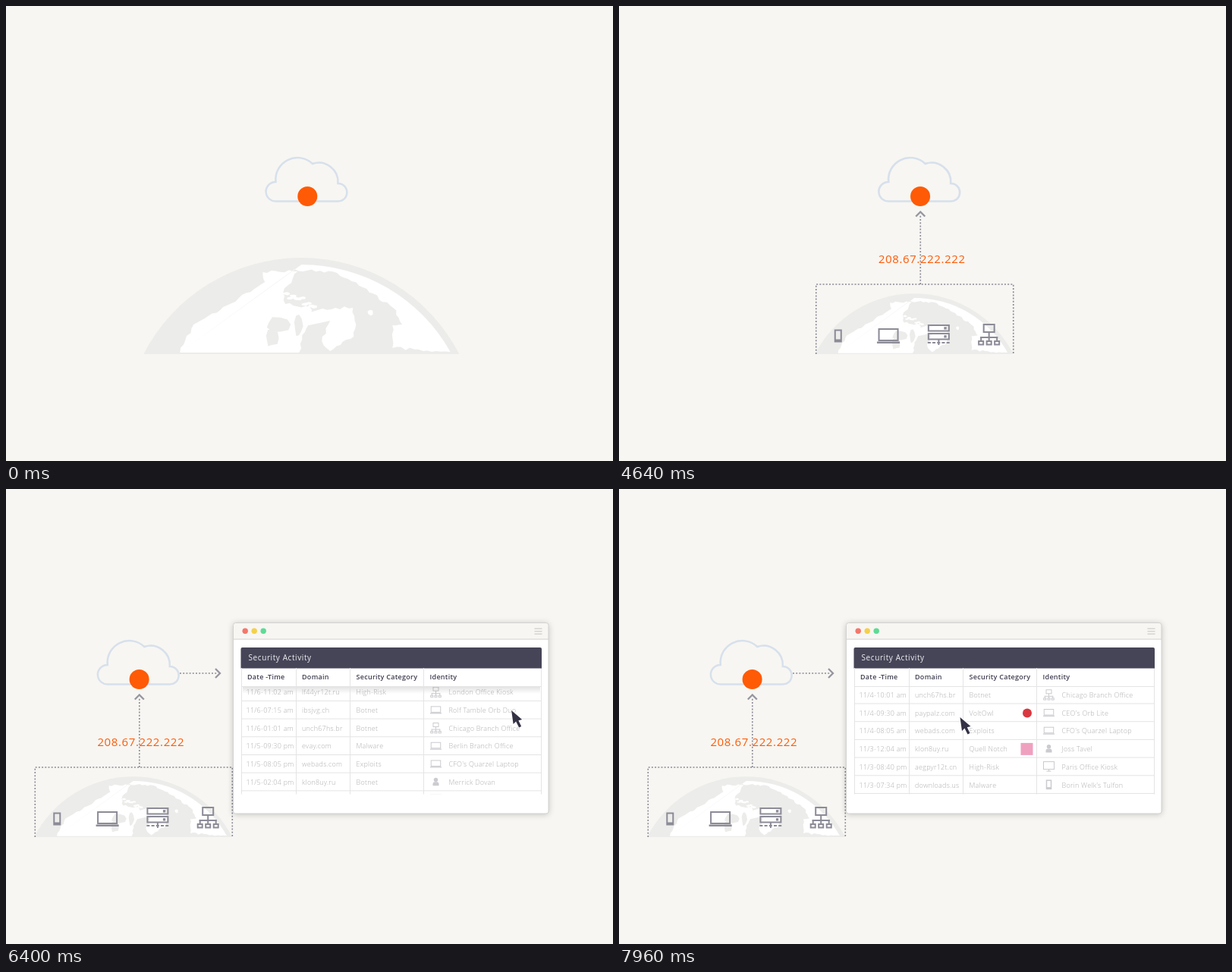
Recreate the animation shown at these times as an HTML page with a canvas. Size 800 by 600 pixels, loop 8 s.

```html
<!DOCTYPE html>
<html lang="en">
<head>
<meta charset="utf-8">
<title>Security activity</title>
<style>
html, body { margin: 0; height: 100%; overflow: hidden; background: #f7f6f2; }
canvas { display: block; width: 800px; height: 600px; }
</style>
</head>
<body>
<canvas id="stage" width="800" height="600"></canvas>
<script>
const LOOP = 8000, STEP = 40;
const screen2d = document.getElementById('stage').getContext('2d');
const buffer = new OffscreenCanvas(800, 600);
const g = buffer.getContext('2d');

const PAPER = '#f7f6f2', INK = '#8c8b97', ORANGE = '#ff5a05', SEA = '#ececea', LINE = '#e4e4e4';
const SANS = '"Open Sans", sans-serif';

const span = (t, a, b) => Math.min(1, Math.max(0, (t - a) / (b - a)));
const inOut = p => p < .5 ? 4 * p ** 3 : 1 - 4 * (1 - p) ** 3;
const smooth = p => p * p * (3 - 2 * p);
const mix = (a, b, p) => a + (b - a) * p;
let seed = 11;
const random = () => (seed = seed * 16807 % 2147483647) / 2147483647;

function at(x, y, scale, alpha, paint) {
  if (alpha <= 0 || scale <= 0) return;
  g.save();
  g.translate(x, y);
  g.scale(scale, scale);
  g.globalAlpha *= alpha;
  paint();
  g.restore();
}
function clipped(x, y, w, h, paint) {
  g.save();
  g.beginPath();
  g.rect(x, y, w, h);
  g.clip();
  paint();
  g.restore();
}
function fill(path, color) {
  g.fillStyle = color;
  g.fill(new Path2D(path));
}
function stroke(path, color, width, dash = []) {
  g.strokeStyle = color;
  g.lineWidth = width;
  g.setLineDash(dash);
  g.stroke(new Path2D(path));
}
function box(x, y, w, h, color) {
  g.fillStyle = color;
  g.fillRect(x, y, w, h);
}
function rounded(x, y, w, h, radius) {
  const path = new Path2D();
  path.roundRect(x, y, w, h, radius);
  return path;
}
function disc(x, y, r, color) {
  g.fillStyle = color;
  g.beginPath();
  g.arc(x, y, r, 0, 7);
  g.fill();
}
function text(str, x, y, font, color, spacing) {
  g.font = `${font} ${SANS}`;
  g.letterSpacing = spacing + 'px';
  g.fillStyle = color;
  g.fillText(str, x, y);
}
const dotted = path => stroke(path, INK, 1.6, [2, 2.2]);
const arrowHead = (x, y, turn) => at(x, y, 1, 1, () => {
  g.rotate(turn);
  stroke('M-6 6L0 0 6 6', '#96959f', 2.3);
});

// Icons are drawn around their own centre.
const ICONS = {
  phone(frame, bar) {
    frame(-4, -7.5, 8, 15);
    bar(-4, 4.5, 8, 3);
  },
  laptop(frame, bar) {
    frame(-12.5, -9, 25, 15);
    bar(-15, 7.5, 30, 2.5);
  },
  server(frame, bar) {
    for (const y of [-12, -1]) {
      frame(-13.5, y, 27, 7.5);
      bar(7, y + 2.2, 3.3, 3.3);
    }
    for (let x = -14.5; x < 14; x += 6.2) bar(x, 10, 4, 2);
    bar(-1, 7, 2, 7);
  },
  network(frame, bar) {
    frame(-7, -13, 14, 10);
    bar(-1, -3, 2, 6);
    bar(-11.5, 3, 23, 2);
    for (const x of [-10.5, 0, 10.5]) {
      bar(x - 1, 3, 2, 6);
      frame(x - 3, 9, 6, 4.5);
    }
  },
  monitor(frame, bar) {
    frame(-14, -13, 28, 20);
    bar(-1, 7, 2, 5);
    bar(-6, 11, 12, 2);
  },
  person(frame, bar, color) {
    disc(0, -5.5, 5.5, color);
    g.fill(rounded(-8, 0, 16, 10, [6, 6, 0, 0]));
  }
};
function icon(name, x, y, scale, alpha, color) {
  at(x, y, scale, alpha, () => {
    g.strokeStyle = color;
    g.lineWidth = 2;
    g.setLineDash([]);
    ICONS[name]((...r) => g.strokeRect(...r), (...r) => box(...r, color), color);
  });
}

// Adds a ragged coast through a few key points.
function coast(path, points) {
  points.forEach(([x, y], i) => {
    if (!i) return path.lineTo(x, y);
    const [px, py] = points[i - 1];
    const length = Math.hypot(x - px, y - py), steps = Math.ceil(length / 6);
    for (let k = 1; k <= steps; k++) {
      const out = k < steps ? (random() - .5) * 4 / length : 0;
      path.lineTo(mix(px, x, k / steps) + (py - y) * out, mix(py, y, k / steps) + (x - px) * out);
    }
  });
  path.closePath();
}
function blob(path, x, y, rx, ry) {
  for (let k = 0; k < 9; k++) {
    const r = .75 + .4 * random(), a = k * Math.PI * 2 / 9;
    path[k ? 'lineTo' : 'moveTo'](x + rx * r * Math.cos(a), y + ry * r * Math.sin(a));
  }
  path.closePath();
}
const land = new Path2D(), bays = new Path2D();
coast(land, [[229, 457], [247, 420], [282, 401], [341, 364], [338, 351], [384, 350],
  [365, 378], [368, 393], [400, 397], [406, 414], [390, 434], [386, 457]]);
coast(land, [[417, 399], [457, 398], [461, 420], [458, 436], [427, 455], [416, 442], [427, 415]]);
land.arc(389, 566, 225, -1.57, -.51);
coast(land, [[584, 456], [509, 451], [509, 421], [522, 420], [510, 398], [470, 371], [436, 352], [380, 347]]);
for (let k = 0; k < 10; k++) blob(land, 370 + 4 * k, 379 + 1.2 * k + 8 * random(), 4.5, 2);
blob(land, 480, 404, 4, 4);
blob(bays, 359, 420, 15, 10);
blob(bays, 350, 438, 9, 11);
blob(bays, 385, 422, 6, 16);

function globe(scale) {
  at(389.3, 459, scale, 1, () => {
    g.translate(-389, -459);
    fill('M181 459A233.8 233.8 0 0 1 597 459Z', SEA);
    clipped(181, 320, 416, 137.3, () => {
      fill(land, '#fff');
      fill(bays, SEA);
    });
  });
}

function network(t) {
  globe(mix(1, .628, inOut(span(t, 40, 520))));
  stroke('M357 257.5H436A11.8 11.8 0 1 0 437.5 234A25.5 25.5 0 0 0 404 208A28.8 28.8 0 0 0 355.5 232A12.8 12.8 0 1 0 357 257.5Z', '#d7e0ec', 2.5);

  const pulse = span(t, 3760, 4160);
  if (pulse < 1) at(397, 248, 1, pulse && .5 * (1 - pulse), () => disc(0, 0, mix(12, 33, pulse), ORANGE));
  disc(397.3, 251, 13, ORANGE);

  ['phone', 'laptop', 'server', 'network'].forEach((name, i) => {
    const start = 1120 + 340 * i;
    icon(name, 289 + 66.3 * i, i < 2 ? 435 : 433, 1, smooth(span(t, start, start + 160)), INK);
  });

  // The dotted lines are uncovered upwards.
  const q = span(t, 2320, 3600) * 2;
  const shown = q < 1 ? 82 * q ** 1.3 : 82 + 107 * (q - 1);
  clipped(250, 459 - shown, 290, shown, () => {
    dotted('M260 459V367H520V459M397.5 367V276');
    arrowHead(397.5, 271.5, 0);
  });

  const ip = span(t, 3160, 3400);
  at(399.5, 333.5, mix(1.76, 1, ip), ip, () => {
    g.textAlign = 'center';
    text('208.67.222.222', 0, 5.3, '15px', ORANGE, .6);
  });
}

const ROWS = `11/6-11:02 am|lf44yr12t.ru|High-Risk|network|London Office Kiosk
11/6-07:15 am|ibsjvg.ch|Botnet|laptop|Rolf Tamble Orb Duo
11/6-01:01 am|unch67hs.br|Botnet|network|Chicago Branch Office
11/5-09:30 pm|evay.com|Malware|laptop|Berlin Branch Office
11/5-08:05 pm|webads.com|Exploits|laptop|CFO's Quarzel Laptop
11/5-02:04 pm|klon8uy.ru|Botnet|person|Merrick Dovan
11/5-01:20 pm|aegpyr12t.cn|High-Risk|monitor|Paris Office Kiosk
11/5-12:11 am|freeads.us|Malware|phone|Lorna Vesk Tulfon
11/4-10:01 am|unch67hs.br|Botnet|network|Chicago Branch Office
11/4-09:30 am|paypalz.com|VoltOwl|laptop|CEO's Orb Lite
11/4-08:05 am|webads.com|Exploits|laptop|CFO's Quarzel Laptop
11/3-12:04 am|klon8uy.ru|Quell Notch|person|Joss Tavel
11/3-08:40 pm|aegpyr12t.cn|High-Risk|monitor|Paris Office Kiosk
11/3-07:34 pm|downloads.us|Malware|phone|Borin Welk's Tulfon`.split('\n').map(row => row.split('|'));
const HEADINGS = { 'Date -Time': 310, 'Domain': 382, 'Security Category': 453.5, 'Identity': 550.5 };
const PITCH = 23.7;

function table(t) {
  const p = span(t, 6040, 7440);
  const rise = 4.71 * p ** 5.17;
  const scroll = 8 * PITCH * rise / (rise + (1 - p) ** 5.17);

  clipped(309, 260, 398, 143, () => ROWS.forEach(([date, domain, category, device, owner], i) => {
    const y = 271.8 + i * PITCH - scroll;
    if (y < 240 || y > 425) return;
    const cell = (str, x) => text(str, x, y + 3.2, '300 9px', '#adadad', .25);
    cell(date, 316.5);
    cell(domain, 390);
    cell(category, 461.5);
    cell(owner, 583.5);
    icon(device, 566.5, y - .5, device === 'phone' ? .75 : .5, 1, '#cbcbd0');
    if (category === 'VoltOwl') disc(538, y, 6, '#d8383f');
    if (category === 'Quell Notch') box(529.5, y - 8, 16, 16, '#f0a0bf');
    box(310, y + 10.7, 396, 1, LINE);
  }));

  const shade = span(t, 6040, 6200) * (1 - span(t, 7320, 7480));
  at(0, 0, 1, shade, () => {
    const soft = g.createLinearGradient(0, 261, 0, 270);
    soft.addColorStop(0, 'rgba(0,0,0,.11)');
    soft.addColorStop(1, 'rgba(0,0,0,0)');
    box(312, 261, 392, 9, soft);
  });

  box(310, 236, 396, 25, '#fff');
  box(310, 260, 396, 1, LINE);
  box(705, 236, 1, 166.5, LINE);
  fill(rounded(309.5, 209, 396.5, 27.5, [2, 2, 0, 0]), '#464558');
  text('Security Activity', 319.5, 226, '10px', '#f0f0f2', .6);
  for (const [label, x] of Object.entries(HEADINGS)) {
    box(Math.floor(x), 236, 1, 166.5, LINE);
    text(label, x + 8, 251, '600 9px', '#3f3e50', .27);
  }
}

function browser(t) {
  at(460, 272, inOut(span(t, 4680, 5260)), 1, () => {
    g.translate(-460, -272);
    const pane = rounded(299.5, 176.5, 415.5, 251.5, 3);
    g.save();
    g.shadowColor = 'rgba(0,0,0,.22)';
    g.shadowBlur = 9;
    g.shadowOffsetY = 1;
    fill(pane, '#fff');
    g.restore();
    fill(rounded(299.5, 176.5, 415.5, 21.5, [3, 3, 0, 0]), PAPER);
    box(299.5, 197.5, 415.5, 1.2, '#d9d9d7');
    stroke(pane, '#d2d2d0', 1);
    ['#f4776b', '#f5d04a', '#5edb95'].forEach((color, i) => {
      disc(315.2 + 12 * i, 187.3, 3.7, color);
      box(696.5, 183.5 + 3.5 * i, 10, 1.3, '#d0d0ce');
    });
    at(0, 0, 1, span(t, 5240, 5400), () => table(t));
  });
}

function cursor(t) {
  const down = smooth(span(t, 6160, 7040)), back = smooth(span(t, 7600, 7960));
  const x = mix(mix(667.5, 660, down), 449.5, back);
  const y = mix(mix(271, 386, down), 301, back);
  at(x, y, 1, span(t, 5640, 5720), () => {
    const arrow = 'M0 0L2.5 18 6 14.5 10 22.5 13 21 9.3 13.3 14 12Z';
    stroke(arrow, 'rgba(255,255,255,.8)', 1.5);
    fill(arrow, '#333144');
  });
}

function scene(t, frameTime) {
  g.textAlign = 'left';
  box(0, 0, 800, 600, PAPER);
  at(-221.7 * inOut(span(t, 4600, 5240)), 0, 1, 1, () => network(t));
  clipped(228, 230, 60 * span(frameTime, 4978, 5336), 26, () => {
    dotted('M229 243H279');
    arrowHead(282, 243, Math.PI / 2);
  });
  browser(t);
  cursor(t);
}

function draw(now) {
  const t = Math.floor(now % LOOP / STEP) * STEP;
  // Motion blur while the view slides: average several moments.
  const samples = t > 4600 && t < 5280 ? 8 : 1;
  for (let k = 0; k < samples; k++) {
    scene(t + (k - (samples - 1) / 2) * 2.5, t);
    screen2d.globalAlpha = 1 / (k + 1);
    screen2d.drawImage(buffer, 0, 0);
  }
}

const begin = performance.now();
function tick() {
  draw(performance.now() - begin);
  requestAnimationFrame(tick);
}
tick();
</script>
</body>
</html>
```
